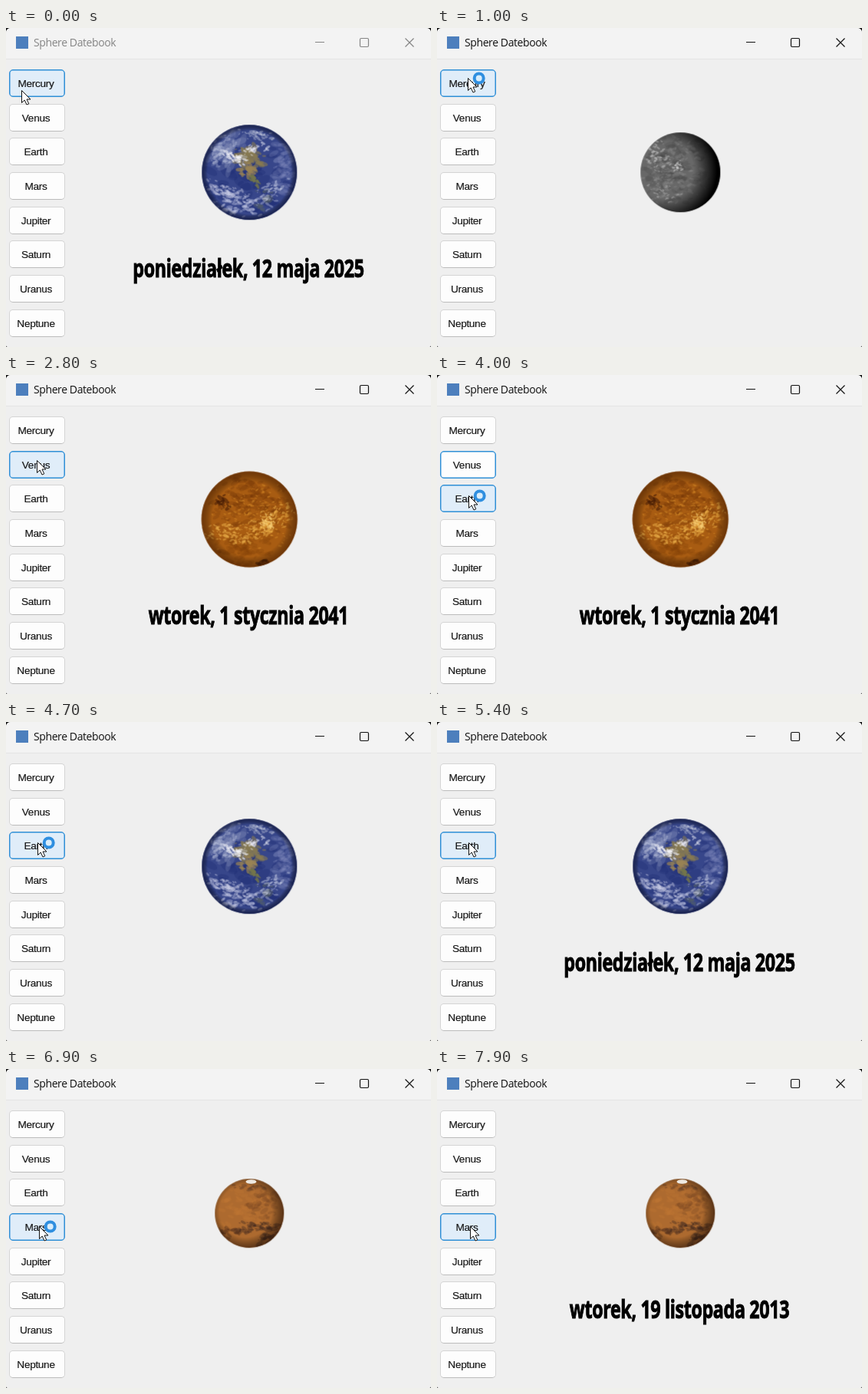
An HTML page with a canvas for the animation above (8 s loop, 554 by 416 pixels).

```html
<!DOCTYPE html>
<html lang="en">
<head>
<meta charset="utf-8">
<title>Sphere Datebook</title>
<style>
html, body { margin: 0; width: 100%; height: 100%; overflow: hidden; background: #1c1c1c; }
#win { position: absolute; left: 0; top: 0; width: 554px; height: 416px; overflow: hidden; background: #efefef; border-radius: 6px 6px 2px 2px; }
#bar { position: absolute; left: 0; top: 0; width: 554px; height: 40px; background: #f3f3f3; border-bottom: 1px solid #e4e4e4; color: #111; }
#bar.idle { color: #858585; }
#bar span { position: absolute; left: 36px; top: 9px; font: 14px/20px "Open Sans", "Noto Sans", sans-serif; letter-spacing: -0.4px; white-space: nowrap; }
#bar i { position: absolute; left: 13px; top: 11px; width: 16px; height: 16px; background: #4d7fbd; }
#bar svg { position: absolute; left: 0; top: 0; fill: none; stroke: currentColor; stroke-width: 1.2; }
.btn { position: absolute; left: 4px; width: 73px; height: 36px; box-sizing: border-box; border: 1px solid #d4d4d4; border-bottom-color: #bcbcbc; border-radius: 5px; background: #fdfdfd; color: #151515; text-align: center; text-indent: -3px; font: 13.7px/36px "Liberation Sans", Arial, sans-serif; letter-spacing: -0.35px; -webkit-text-stroke: 0.15px #151515; }
.btn.focus, .btn.hover { border-color: #2f8fd6; box-shadow: inset 0 0 0 0.5px #2f8fd6; }
.btn.hover { background: #e0edf9; }
/* A heavy condensed face, made from the bold one. */
#date { position: absolute; left: 66px; width: 500px; top: 292px; text-align: center; color: #000; white-space: nowrap; font: 900 33px/42px "Noto Sans", "Open Sans", sans-serif; letter-spacing: -0.5px; -webkit-text-stroke: 1px #000; transform: scaleX(0.705); }
canvas { position: absolute; left: 0; top: 0; }
</style>
</head>
<body>
<div id="win">
  <div id="bar"><i></i><span>Sphere Datebook</span>
    <svg width="554" height="40"><path d="M403 18.5h12M520.5 13.5l11 11M531.5 13.5l-11 11"/><rect x="461.5" y="13.5" width="11" height="11" rx="1.5"/></svg>
  </div>
  <div id="date"></div>
  <canvas id="cv" width="554" height="416"></canvas>
</div>
<script>
const LOOP = 8000, STEP = 100, TAU = Math.PI * 2;
const win = document.getElementById('win');
const bar = document.getElementById('bar');
const date = document.getElementById('date');
const canvas = document.getElementById('cv');
const ctx = canvas.getContext('2d');

const buttons = ['Mercury', 'Venus', 'Earth', 'Mars', 'Jupiter', 'Saturn', 'Uranus', 'Neptune'].map((name, i) => {
  const b = document.createElement('div');
  b.textContent = name;
  b.style.top = Math.round(53.8 + 44.7 * i) + 'px';
  win.insertBefore(b, canvas);
  return b;
});

function seeded(s) {
  return () => {
    s = (s + 0x6D2B79F5) | 0;
    let t = Math.imul(s ^ (s >>> 15), 1 | s);
    t = (t + Math.imul(t ^ (t >>> 7), 61 | t)) ^ t;
    return ((t ^ (t >>> 14)) >>> 0) / 4294967296;
  };
}

// A disc centred on the origin, shaded towards its rim.
function disc(r, base, seed, paint, shade) {
  const c = document.createElement('canvas');
  c.width = c.height = 140;
  const g = c.getContext('2d'), rnd = seeded(seed);
  g.translate(70, 70);
  g.beginPath();
  g.arc(0, 0, r, 0, TAU);
  g.clip();
  g.fillStyle = base;
  g.fillRect(-70, -70, 140, 140);
  const blob = (x, y, w, h, color, turn = 0) => {
    g.fillStyle = color;
    g.beginPath();
    g.ellipse(x, y, w, h, turn, 0, TAU);
    g.fill();
  };
  // Scatter soft flecks around a point.
  const fleck = (n, x, y, sx, sy, size, color, turn = 0) => {
    for (let i = 0; i < n; i++) {
      const u = rnd() + rnd() - 1, v = rnd() + rnd() - 1;
      const px = x + u * sx * Math.cos(turn) - v * sy * Math.sin(turn);
      const py = y + u * sx * Math.sin(turn) + v * sy * Math.cos(turn);
      const s = size * (0.3 + rnd());
      blob(px, py, s * 1.5, s * 0.7, color, turn + (rnd() - 0.5) * 1.6);
    }
  };
  paint(blob, fleck);
  const [sx, sy, from, color] = shade;
  const grad = g.createRadialGradient(sx, sy, r * from, sx, sy, r + Math.hypot(sx, sy) * 0.8);
  grad.addColorStop(0, 'transparent');
  grad.addColorStop(1, color);
  g.fillStyle = grad;
  g.fillRect(-70, -70, 140, 140);
  return c;
}

const discs = [
  disc(52, '#686868', 5, (blob, fleck) => {
    fleck(140, -8, 0, 55, 55, 4, 'rgba(60,60,60,.16)');
    fleck(160, -12, 0, 50, 52, 2.2, 'rgba(150,150,150,.25)');
    fleck(50, -30, -22, 18, 22, 1.6, 'rgba(205,205,205,.4)');
    fleck(24, -2, -9, 8, 10, 1.4, 'rgba(210,210,210,.5)');
    fleck(30, -20, 26, 24, 16, 1.3, 'rgba(190,190,190,.4)');
  }, [-20, -3, 0.72, 'rgba(0,0,0,1)']),

  disc(62.5, '#a85c12', 9, (blob, fleck) => {
    fleck(130, 0, -22, 62, 42, 4, 'rgba(110,50,5,.25)');
    fleck(80, -8, 38, 50, 25, 4, 'rgba(125,60,5,.22)');
    fleck(14, -34, -22, 12, 12, 3, 'rgba(65,25,5,.55)');
    fleck(10, 20, 58, 10, 6, 3, 'rgba(60,25,5,.6)');
    fleck(200, 4, -3, 62, 50, 1.3, 'rgba(220,145,45,.42)');
    fleck(120, -25, 18, 40, 15, 1.7, 'rgba(235,175,75,.5)', 0.1);
    fleck(120, 28, 2, 38, 18, 1.7, 'rgba(240,180,75,.5)', -0.55);
    fleck(40, 22, 4, 14, 14, 1.6, 'rgba(250,210,120,.6)', 0.9);
  }, [0, 0, 0.78, 'rgba(75,30,0,.6)']),

  disc(62, '#37468a', 3, (blob, fleck) => {
    fleck(50, 0, 10, 62, 60, 7, 'rgba(30,44,115,.35)');
    fleck(70, -30, -30, 34, 30, 5, 'rgba(150,158,195,.22)', -0.7);
    fleck(60, 45, -8, 16, 44, 4, 'rgba(135,145,190,.25)');
    fleck(80, 2, -18, 26, 17, 3.4, 'rgba(135,122,82,.6)', 0.4);
    fleck(24, -1, -4, 9, 13, 3, 'rgba(155,132,85,.7)', 0.7);
    fleck(18, 8, 12, 10, 5, 2.2, 'rgba(115,118,75,.8)', 0.8);
    fleck(20, 18, 36, 14, 16, 3, 'rgba(85,95,100,.45)');
    fleck(70, -36, -26, 24, 28, 2.2, 'rgba(205,210,230,.32)', -0.7);
    fleck(40, -18, -18, 18, 7, 2, 'rgba(242,242,248,.62)', 0.35);
    fleck(30, 4, -30, 22, 8, 1.8, 'rgba(235,235,245,.5)', -0.2);
    fleck(40, 8, -48, 30, 9, 2, 'rgba(205,210,225,.4)', 0.2);
    fleck(90, -30, 27, 36, 12, 2, 'rgba(205,208,232,.42)', 0.35);
    fleck(100, -4, 43, 52, 17, 2.2, 'rgba(195,200,228,.4)', -0.15);
    fleck(45, 30, 22, 26, 10, 1.8, 'rgba(210,215,235,.4)', -0.5);
  }, [0, 0, 0.88, 'rgba(15,22,62,.75)']),

  disc(45, '#ad6a2f', 21, (blob, fleck) => {
    fleck(60, -8, -6, 42, 38, 4, 'rgba(195,120,55,.25)');
    fleck(50, 18, -14, 26, 28, 3.4, 'rgba(120,68,35,.28)');
    fleck(55, 8, 18, 38, 9, 2.6, 'rgba(65,42,30,.4)', -0.12);
    fleck(30, 24, 32, 20, 10, 2.8, 'rgba(60,38,28,.4)', -0.5);
    fleck(24, -28, 26, 14, 12, 2.4, 'rgba(85,48,25,.4)', 0.5);
    fleck(20, 0, -34, 32, 7, 2.2, 'rgba(90,55,35,.4)');
  }, [-5, -3, 0.76, 'rgba(45,22,10,.65)'])
];

const texts = ['czwartek, 7 sierpnia 2104', 'wtorek, 1 stycznia 2041', 'poniedziałek, 12 maja 2025', 'wtorek, 19 listopada 2013'];

// Rows of [time, value]; the last row already reached applies.
const planetAt = [[0, 2], [800, 0], [2700, 1], [4700, 2], [6800, 3]];
const dateAt = [[0, 2], [800, -1], [1200, 0], [2600, -1], [2800, 1], [4700, -1], [4900, 2], [6800, -1], [7000, 3]];
const focusAt = [[0, 0], [2400, 1], [4600, 2], [6700, 3]];
const busyAt = [[0, 0], [800, 1], [1500, 0], [2400, 1], [2800, 0], [3900, 1], [5300, 0], [6100, 1], [7400, 0]];
const moves = [[0, 20, 81], [100, 20, 81], [500, 40, 65], [1900, 40, 65], [2300, 40, 111], [3500, 40, 111], [3900, 41, 157], [5600, 41, 157], [6000, 43, 205], [LOOP, 43, 205]];

const pick = (rows, t) => rows.filter(r => r[0] <= t).pop()[1];

function pointer(t) {
  const i = moves.findIndex(m => m[0] > t);
  const [t0, x0, y0] = moves[i - 1], [t1, x1, y1] = moves[i];
  const k = (t - t0) / (t1 - t0), e = k * k * (3 - 2 * k);
  return [x0 + (x1 - x0) * e, y0 + (y1 - y0) * e];
}

const arrow = new Path2D('M.5 .5V16.5L4.2 13L7 19L9.8 17.8L7 12H12Z');

function drawCursor(x, y, busy) {
  ctx.save();
  ctx.translate(x, y);
  ctx.fillStyle = '#fff';
  ctx.strokeStyle = '#111';
  ctx.lineWidth = 1;
  ctx.fill(arrow);
  ctx.stroke(arrow);
  if (busy) {
    ctx.beginPath();
    ctx.arc(14.7, 0.5, 6, 0, TAU);
    ctx.fillStyle = '#d9edfb';
    ctx.fill();
    ctx.lineWidth = 4;
    ctx.strokeStyle = '#2f8fe0';
    ctx.stroke();
  }
  ctx.restore();
}

function drawPlanet(i) {
  ctx.drawImage(discs[i], 247.3, 118.2);
  if (i < 3) return;
  ctx.fillStyle = '#eee9e2';
  ctx.beginPath();
  ctx.ellipse(319.5, 147, 7, 2.8, 0, 0, TAU);
  ctx.fill();
}

function frame(now) {
  const t = Math.floor((now % LOOP) / STEP) * STEP;
  const [x, y] = pointer(t);
  const over = buttons.findIndex(b => y >= b.offsetTop && y < b.offsetTop + 36);
  const focus = pick(focusAt, t);
  buttons.forEach((b, i) => {
    b.className = 'btn' + (i === focus ? ' focus' : '') + (i === over ? ' hover' : '');
  });
  bar.className = t < 700 ? 'idle' : '';
  date.textContent = texts[pick(dateAt, t)] || '';
  ctx.clearRect(0, 0, 554, 416);
  drawPlanet(pick(planetAt, t));
  drawCursor(x, y, pick(busyAt, t));
  requestAnimationFrame(frame);
}
frame(0);
</script>
</body>
</html>
```
